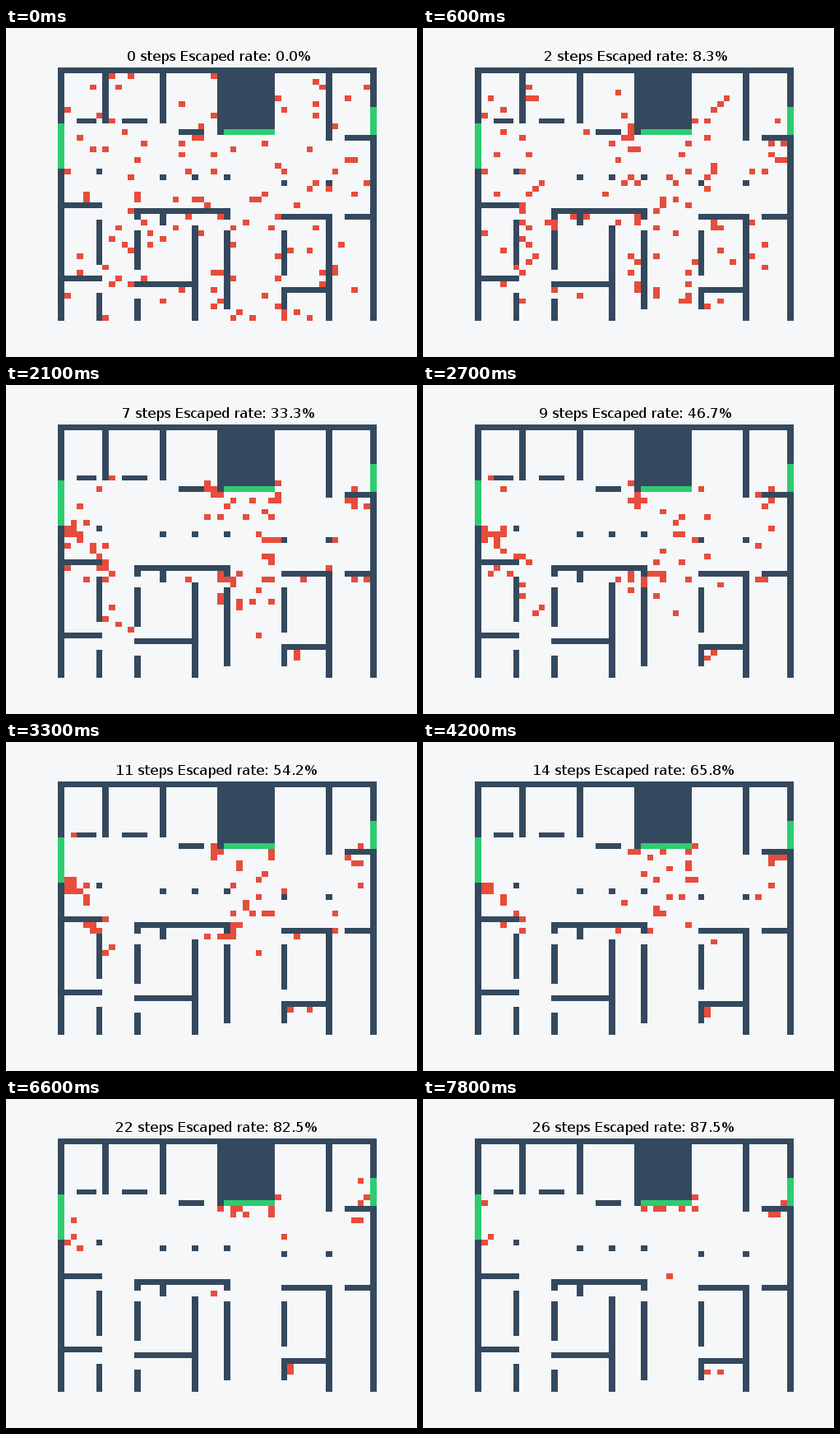
A matplotlib script that plays this animation: 500x400 px, repeating every 8000 ms.

```python
import numpy as np
import matplotlib.pyplot as plt
from matplotlib.animation import FuncAnimation
from matplotlib.colors import ListedColormap

# Whole-pixel letter spacing
plt.rcParams.update({"text.hinting": "default", "text.hinting_factor": 1})

ROWS, COLS, PEOPLE = 45, 50, 120
STEP_MS, TICK_MS, LOOP_MS = 300, 100, 8000
FLOOR, WALL, EXIT, PERSON = range(4)
PAPER = "#f5f7f8"
COLORS = ListedColormap([PAPER, "#34495e", "#2ecc71", "#e74c3c"])
MOVES = [(dr, dc) for dr in (-1, 0, 1) for dc in (-1, 0, 1)]


def build_plan():
    plan = np.full((ROWS, COLS), FLOOR)
    last = ROWS - 1

    def across(row, left, right, kind=WALL):
        plan[row, left:right + 1] = kind

    def down(col, top, bottom, kind=WALL):
        plan[top:bottom + 1, col] = kind

    # Outer walls and the solid core
    across(0, 0, COLS - 1)
    down(0, 0, last)
    down(COLS - 1, 0, last)
    plan[:12, 25:34] = WALL

    # Upper rooms
    down(7, 1, 9)
    down(16, 1, 9)
    down(42, 1, 12)
    across(9, 3, 5)
    across(9, 10, 13)
    across(11, 19, 22)
    across(12, 45, 48)

    # Pillars in the hall
    for row, col in [(18, 6), (19, 16), (19, 21), (19, 26), (20, 35), (20, 42)]:
        plan[row, col] = WALL

    # Lower left rooms
    across(24, 1, 6)
    across(37, 1, 6)
    down(6, 27, 34)
    down(6, 40, last)

    # Lower middle rooms
    across(25, 12, 26)
    across(38, 12, 21)
    down(12, 26, 26)
    down(12, 29, 35)
    down(12, 41, last)
    down(16, 26, 27)
    down(21, 28, last)
    down(26, 26, 26)
    down(26, 29, 42)

    # Lower right rooms
    across(26, 35, 42)
    across(26, 45, 48)
    across(39, 35, 41)
    down(35, 29, 36)
    down(35, 39, 42)
    down(42, 26, last)

    down(0, 10, 17, EXIT)
    across(11, 26, 33, EXIT)
    down(COLS - 1, 7, 11, EXIT)
    return plan


PLAN = build_plan()


def sight_distance():
    """Straight-line distance to the nearest exit, through walls."""
    r, c = np.indices(PLAN.shape)
    return np.min([np.hypot(r - er, c - ec)
                   for er, ec in np.argwhere(PLAN == EXIT)], axis=0)


def walk_distance():
    """Distance to the nearest exit around the walls."""
    dist = np.where(PLAN == EXIT, 0.0, np.inf)
    for _ in range(150):
        padded = np.pad(dist, 1, constant_values=np.inf)
        near = [padded[1 + dr:1 + dr + ROWS, 1 + dc:1 + dc + COLS]
                + np.hypot(dr, dc) for dr, dc in MOVES]
        dist = np.where(PLAN == WALL, np.inf, np.min(near, axis=0))
    return dist


def escaped_at(step):
    return int(round(np.interp(step, [0, 5, 9, 14, 18, 22, 26],
                               [0, 24, 56, 79, 86, 99, 105])))


def simulate(steps):
    """People head for the exit they sense, a little at random."""
    rng = np.random.default_rng(7)
    walk = walk_distance()
    pull = 0.65 * sight_distance() + 0.35 * walk
    pull[PLAN != FLOOR] = np.inf
    pull = np.pad(pull, ((0, 1), (0, 0)), constant_values=np.inf)

    free = np.argwhere(PLAN == FLOOR)
    people = [tuple(cell) for cell in rng.choice(free, PEOPLE)]
    history = [people]
    for step in range(1, steps):
        people = list(people)
        for _ in range(2):
            people.sort(key=lambda p: walk[p])
            taken = set(people)
            for i, (r, c) in enumerate(people):
                taken.discard((r, c))
                options = [(r + dr, c + dc) for dr, dc in MOVES
                           if (r + dr, c + dc) not in taken]
                noise = rng.normal(0, 0.8, len(options))
                people[i] = options[np.argmin([pull[p] for p in options] + noise)]
                taken.add(people[i])
        people.sort(key=lambda p: walk[p])
        people = people[len(people) - (PEOPLE - escaped_at(step)):]
        history.append(people)
    return history


HISTORY = simulate(-(-LOOP_MS // STEP_MS))

fig = plt.figure(figsize=(5, 4), dpi=100, facecolor=PAPER)
ax = fig.add_axes([0.125, 0.11, 0.775, 0.77])
ax.axis("off")
image = ax.imshow(PLAN, cmap=COLORS, vmin=0, vmax=3,
                  aspect="auto", interpolation="nearest")
title = ax.set_title("", fontsize=12, fontfamily="DejaVu Sans", color="black")


def draw(tick):
    step = tick * TICK_MS // STEP_MS
    grid = PLAN.copy()
    for cell in HISTORY[step]:
        grid[cell] = PERSON
    image.set_data(grid)
    rate = 100 * escaped_at(step) / PEOPLE
    title.set_text(f"{step:2d} steps Escaped rate: {rate:.1f}%")
    return image, title


animation = FuncAnimation(fig, draw, frames=LOOP_MS // TICK_MS,
                          interval=TICK_MS, repeat=True, repeat_delay=0)
plt.show()
```
